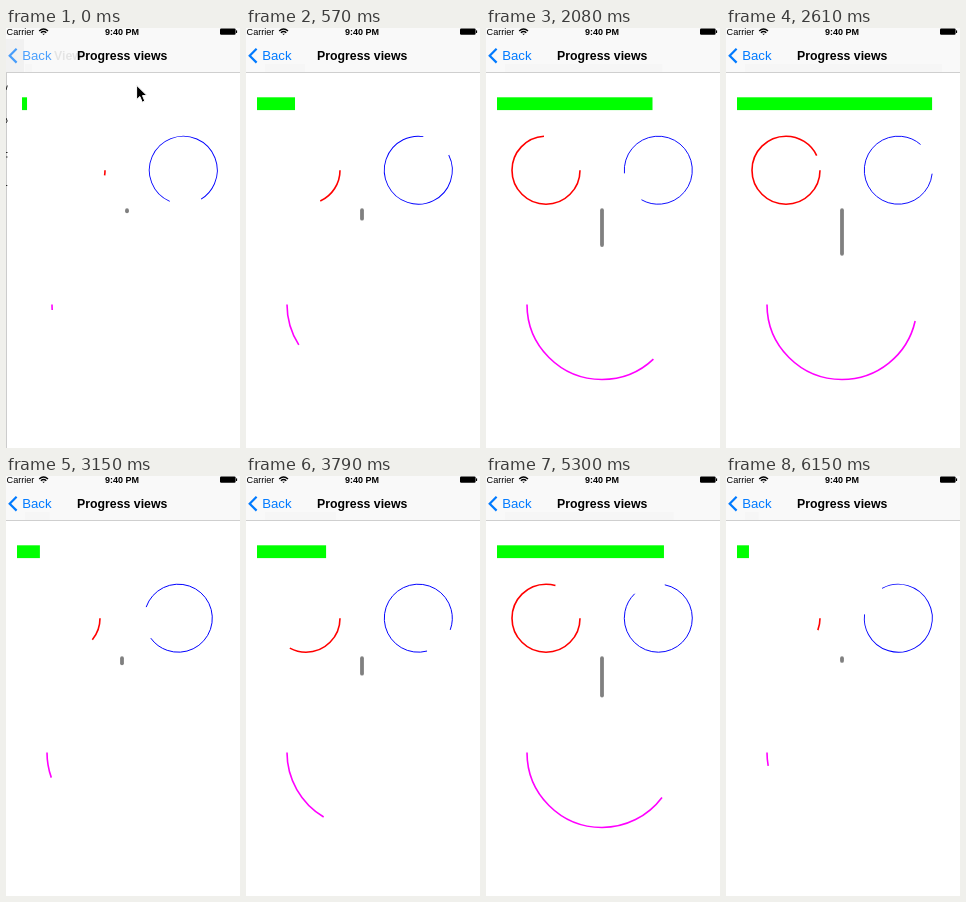
An HTML page that plays this animation: 234 by 420 pixels, repeating every 6230 ms.

```html
<!DOCTYPE html>
<html lang="en">
<head>
<meta charset="utf-8">
<title>Progress views</title>
<style>
  html, body { margin: 0; width: 100%; height: 100%; overflow: hidden; background: #fff; }
  svg { display: block; width: 234px; height: 420px; font-family: "Liberation Sans", Arial, sans-serif; }
  .arc { fill: none; }
  .bold { font-weight: bold; }
</style>
</head>
<body>
<svg viewBox="0 0 234 420">
  <rect width="234" height="420" fill="#fff"/>

  <g id="views">
    <rect id="bar" x="11" y="69.3" height="12.8" fill="#0f0"/>
    <circle id="ring" class="arc" cx="60" cy="142.2" r="34" pathLength="1" stroke="#f00" stroke-width="1.6"/>
    <circle id="spinner" class="arc" cx="172.3" cy="142.2" r="34" pathLength="360" stroke="#00f" stroke-width=".9" stroke-dasharray="305 55"/>
    <line id="nose" x1="116" x2="116" y1="182.2" stroke="#808080" stroke-width="3.8" stroke-linecap="round"/>
    <path id="smile" class="arc" d="M41 276.5A75 75 0 0 0 191 276.5" pathLength="1" stroke="#f0f" stroke-width="1.6"/>
  </g>

  <rect width="234" height="44" fill="#f9f9f9"/>
  <rect id="blur" x="19" y="36" height="8" fill="#000" opacity=".012"/>
  <rect y="44" width="234" height=".8" fill="#c4c4c4"/>

  <g id="leaving">
    <rect y="11" width="18" height="33" opacity=".03"/>
    <text class="bold" x="48" y="32" font-size="12.3" opacity=".08">Views</text>
    <rect y="45" width="1" height="375" fill="#ccc"/>
    <path class="arc" d="M1.3 57.5L0 62M0 90L1.2 93L0 95M0 124.5H1.5M0 129H1.5M0 157.5H1.3" stroke="#222" stroke-width="1"/>
  </g>

  <g id="back" fill="#007aff">
    <path class="arc" d="M10.6 20.8L3.7 27.7L10.6 34.6" stroke="#007aff" stroke-width="2.2"/>
    <text x="16.2" y="32" font-size="13.2">Back</text>
  </g>
  <text class="bold" x="116.2" y="32" font-size="12.3" text-anchor="middle">Progress views</text>

  <text x=".6" y="7" font-size="9.1">Carrier</text>
  <g class="arc" stroke="#000" stroke-width="1.4">
    <path d="M33.2 2.9Q37.6 -1.1 42 2.9M34.9 4.7Q37.6 2.3 40.3 4.7"/>
    <path d="M36.3 5.7H38.9L37.6 7.1Z" fill="#000" stroke="none"/>
  </g>
  <text class="bold" x="116" y="7" font-size="9" text-anchor="middle">9:40 PM</text>
  <rect x="214" y=".4" width="15.6" height="6.4" rx="1.2"/>
  <rect x="230" y="2.3" width="1.1" height="2.6" rx=".5"/>

  <path id="cursor" d="M130.6 57.3V71.6L133.9 68.5L136.2 74.2L138.8 73.1L136.5 67.6H141Z" stroke="#fff" stroke-width="1"/>
</svg>
<script>
  const LOOP = 6230, STEP = 58.15, LAST = 106;
  // [step, accumulated progress, spinner gap angle in degrees]
  const KEYS = [
    [0, .024, 86], [10, .181, 306], [27, .552, 676], [45, .929, 1058.4],
    [65, 1.329, 1487.6], [91, 1.795, 2053.5], [106, 2.057, 2374]
  ];
  const el = id => document.getElementById(id);
  const set = (id, name, value) => el(id).setAttribute(name, value);

  function stepAt(t) {
    return t < 50 ? 0 : Math.min(LAST, 1 + Math.floor((t - 50) / STEP + .2));
  }

  function sample(step, column) {
    const i = Math.max(1, KEYS.findIndex(key => key[0] >= step));
    const a = KEYS[i - 1], b = KEYS[i];
    return a[column] + (b[column] - a[column]) * (step - a[0]) / (b[0] - a[0]);
  }

  function draw(t) {
    const step = stepAt(t);
    const p = sample(step, 1) % 1;
    const gap = sample(step, 2);
    const push = step < 4 ? Math.exp(-step) : 0;
    const width = Math.min(202, 210 * p);

    set("views", "transform", `translate(${5 * push})`);
    set("bar", "width", width);
    set("blur", "width", Math.min(198, width + 2));
    set("ring", "stroke-dasharray", `${p} 2`);
    set("smile", "stroke-dasharray", `${p} 2`);
    set("nose", "y2", 182.2 + 47 * p);
    set("spinner", "transform", `rotate(${gap + 27.5} 172.3 142.2)`);
    set("leaving", "opacity", push);
    set("back", "opacity", 1 - .3 * push);
    set("cursor", "visibility", step ? "hidden" : "visible");
  }

  const start = performance.now();
  function tick() {
    draw((performance.now() - start) % LOOP);
    requestAnimationFrame(tick);
  }
  tick();
</script>
</body>
</html>
```
